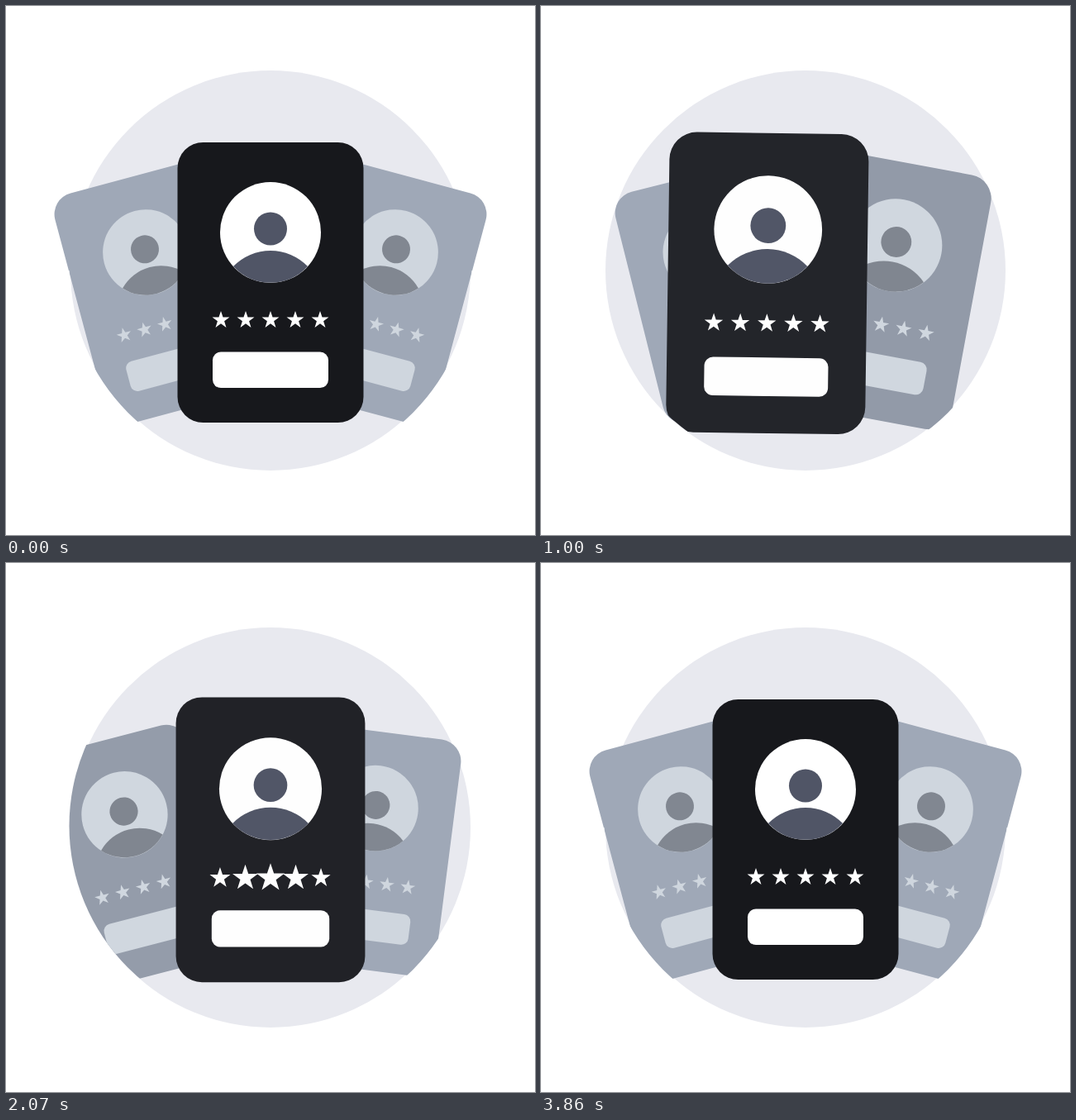
An HTML page for the animation above (4000 ms loop, 640 by 640 pixels).

```html
<!DOCTYPE html>
<html lang="en">
<head>
<meta charset="utf-8">
<title>Profile cards</title>
<style>
  @property --body { syntax: '<color>'; inherits: true; initial-value: #17181c; }
  @property --face { syntax: '<color>'; inherits: true; initial-value: #fff; }
  @property --ink  { syntax: '<color>'; inherits: true; initial-value: #505566; }

  html, body { margin: 0; width: 100%; height: 100%; overflow: hidden; background: #fff; }
  svg { position: absolute; inset: 0; width: 100%; height: 100%; }

  .body { fill: var(--body); }
  .face { fill: var(--face); }
  .ink { fill: var(--ink); }

  .layer, .layer * {
    animation: 4s cubic-bezier(.333, 0, .667, 1) infinite;
    animation-name: none;
  }
  .dome { clip-path: url(#dome); }
  .left, .right { --body: #9fa8b7; --face: #cfd6de; --ink: #818791; }

  /* centre card: lifts, is thrown to the left, swings back behind */
  .centre { z-index: 3; animation-name: drop, dim; animation-timing-function: step-end, cubic-bezier(.333, 0, .667, 1); }
  .centre .dome { animation-name: window; animation-timing-function: step-end; }
  .centre .card { animation-name: throw-move, throw-turn, throw-size; }

  /* right card: becomes the centre card */
  .right { z-index: 2; animation-name: light; }
  .right .card { animation-name: enter-move, enter-turn, enter-size; }
  .right .star { animation-name: pop; animation-delay: calc(var(--i) * 125ms); }
  .right .button { animation-name: press; }

  /* left card: slides behind to the right */
  .left { z-index: 0; }
  .left .card {
    animation-name: slide-move, slide-turn;
    animation-timing-function: cubic-bezier(.33, 0, .38, 1), cubic-bezier(.333, 0, .667, 1);
    scale: .85;
  }

  @keyframes drop { 0% { z-index: 3; } 30%, 100% { z-index: 1; } }
  @keyframes window { 0% { clip-path: url(#disc); } 60.5%, 100% { clip-path: url(#dome); } }
  @keyframes dim {
    0%, 17.25% { --body: #17181c; }
    0%, 22.5% { --face: #fff; --ink: #505566; }
    54.25%, 100% { --face: #cfd6de; --ink: #818791; }
    59.25%, 100% { --body: #9fa8b7; }
  }
  @keyframes light {
    0%, 17% { --body: #9fa8b7; }
    0%, 22.5% { --face: #cfd6de; --ink: #818791; }
    54.25%, 100% { --face: #fff; --ink: #505566; }
    58.5%, 100% { --body: #17181c; }
  }

  @keyframes throw-move {
    0% { translate: 320px 334.5px; }
    16%, 17% { translate: 352px 325px; }
    40.45% { translate: 64px 363px; }
    60.5% { translate: 219px 348.5px; }
    74%, 100% { translate: 182.3px 347.7px; }
  }
  @keyframes throw-turn {
    0% { rotate: 0deg; }
    16%, 17.75% { rotate: 7.8deg; }
    42.3% { rotate: -25.4deg; }
    60.5% { rotate: -5deg; }
    74%, 100% { rotate: -15deg; }
  }
  @keyframes throw-size {
    0% { scale: 1; }
    8.75%, 17% { scale: 1.1; }
    55%, 100% { scale: .85; }
  }

  @keyframes enter-move {
    0%, 17.5% { translate: 457.7px 347.7px; }
    39%, 40% { translate: 320px 336px; }
    56.25%, 100% { translate: 320px 334.5px; }
  }
  @keyframes enter-turn {
    0%, 17.25% { rotate: 15deg; }
    38.75%, 100% { rotate: 0deg; }
  }
  @keyframes enter-size {
    0%, 17.25% { scale: .85; }
    38.75%, 40% { scale: 1.092; }
    56.25%, 100% { scale: 1; }
  }

  @keyframes slide-move {
    0%, 17% { translate: 182.3px 347.7px; }
    63.2%, 100% { translate: 457.7px 347.7px; }
  }
  @keyframes slide-turn {
    0%, 20% { rotate: -15deg; }
    67.5%, 100% { rotate: 15deg; }
  }

  @keyframes pop {
    0%, 19.75% { scale: 1; }
    28.25%, 29% { scale: 0; }
    45.5% { scale: 1.6; }
    55.25%, 100% { scale: 1; }
  }
  @keyframes press {
    0%, 62.5% { scale: 1; }
    70.75% { scale: .96; }
    80% { scale: 1.057; }
    95.5%, 100% { scale: 1; }
  }
</style>
</head>
<body>
<svg viewBox="0 0 640 640">
  <defs>
    <clipPath id="disc"><circle cx="319" cy="318" r="242.5"/></clipPath>
    <clipPath id="dome"><path d="M0 0H640V320H563.5A243.5 243.5 0 0 1 76.5 320H0Z"/></clipPath>
  </defs>
  <circle cx="320" cy="320" r="242" fill="#e8e9ef"/>
</svg>
<script>
  const starPoints = Array.from({ length: 10 }, (_, i) => {
    const r = i % 2 ? 4.3 : 11, a = i * Math.PI / 5;
    return `${(r * Math.sin(a)).toFixed(2)},${(-r * Math.cos(a)).toFixed(2)}`;
  }).join(' ');

  const stars = [0, 1, 2, 3, 4].map(i =>
    `<polygon class="star face" points="${starPoints}" style="--i:${i};translate:${i * 30 - 60}px 45.5px"/>`
  ).join('');

  const card = `
    <g class="card">
      <rect class="body" x="-112.5" y="-169.5" width="225" height="339" rx="31"/>
      <circle class="face" cy="-60.5" r="61"/>
      <circle class="ink" cy="-65" r="20"/>
      <path class="ink" d="M-45-19.5A62.8 62.8 0 0 1 45-19.5A61 61 0 0 1-45-19.5Z"/>
      ${stars}
      <rect class="button face" x="-70" y="-21.8" width="140" height="43.6" rx="10" style="translate:0 105.8px"/>
    </g>`;

  document.body.insertAdjacentHTML('beforeend', ['left', 'right', 'centre'].map(name =>
    `<svg class="layer ${name}" viewBox="0 0 640 640"><g class="dome">${card}</g></svg>`
  ).join(''));
</script>
</body>
</html>
```
